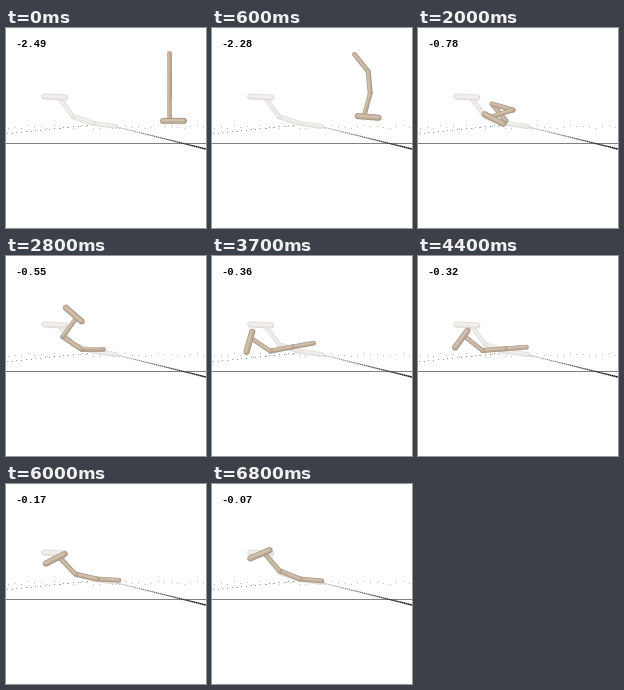
A matplotlib script that plays this animation: 200 by 200 pixels, repeating every 8 s.

```python
import matplotlib.pyplot as plt
import numpy as np
from matplotlib.animation import FuncAnimation

SIZE, DPI = 200, 100
STEP, FRAMES = 100, 80
END = 6800                       # the last pose is held from here on
FALL = 1200                      # the first stage starts from rest
PT = 72 / DPI

TORSO, THIGH, LEG, FOOT = 22, 22, 24, 21
HEEL = 0.3                       # share of the foot behind the ankle

# time: hip x, hip y, directions of torso, thigh, leg, foot in degrees, score
KEYS = {
    0: (163, 47, 270, 90, 90, 0, -2.49),
    FALL: (136, 33, 115, 69, 151, 18, -1.65),
    2000: (74, 76, 50, 16, 163, 27, -0.78),
    2800: (75, 93, 0, -146, -54, -139, -0.55),
    3200: (74, 92, -3, -172, -172, -180, -0.46),
    3700: (80, 91, -10, -191, -146, -254, -0.36),
    5200: (94, 95, 2, -177, -137, -211, -0.27),
    END: (88, 95, 5, -158, -131, -203, -0.07),
}
GOAL = (88, 95.5, 8, 198, 234, 183)
TAN = ("#a99886", "#c0ad99", "#d0c0ae")
PALE = ("#e0ddd9", "#e9e6e3", "#f2f0ee")


def state_at(t):
    if t < FALL:
        t = t * t / FALL
    return [np.interp(t, list(KEYS), column) for column in zip(*KEYS.values())]


def limbs(x, y, *turns):
    """End points of torso, thigh, leg and foot."""
    torso, thigh, leg, foot = (np.array([np.cos(a), np.sin(a)]) for a in np.radians(turns))
    hip = np.array([x, y])
    knee = hip + THIGH * thigh
    ankle = knee + LEG * leg
    heel = ankle - HEEL * FOOT * foot
    return [(hip + TORSO * torso, hip), (hip, knee), (knee, ankle), (heel, heel + FOOT * foot)]


fig = plt.figure(figsize=(SIZE / DPI, SIZE / DPI), dpi=DPI, facecolor="white")
ax = fig.add_axes([0, 0, 1, 1])
ax.set(xlim=(0, SIZE), ylim=(SIZE, 0))
ax.axis("off")


def make_body(colors, z):
    def stroke(color, width, level):
        return ax.plot([], [], color=color, lw=width * PT, solid_capstyle="round",
                       zorder=level)[0]

    return [[stroke(c, w * k, z + i * 0.1) for c, k in zip(colors, (1, 0.75, 0.35))]
            for i, w in enumerate((4.8, 5, 4.6, 6.2))]


def place(body, pose):
    for layers, (a, b) in zip(body, limbs(*pose)):
        for i, line in enumerate(layers):
            line.set_data(*(np.array([a, b]) - 0.3 * i).T)


def draw_floor():
    ax.plot([0, SIZE], [114.5, 114.5], color="#808080", lw=PT, zorder=1)

    def dots(x, y, color):
        ax.scatter(x, y, s=(0.9 * PT) ** 2, c=color, lw=0, zorder=1)

    x = np.arange(1, 82, 4.7)
    dots(x, 105.5 - x * 0.105, "#8c8c8c")
    rng = np.random.default_rng(4)
    x = np.arange(2, SIZE, 6.5)
    dots(x, 98.5 + rng.uniform(-2, 2, x.size), "#b0b0b0")

    # Checkered edge that grows toward the viewer
    for x in np.arange(110, SIZE, 1.9):
        near = (x - 100) / 100
        y = 98.8 + (x - 110) * 0.247
        ax.plot([x, x + 1 + 0.8 * near], [y, y + 0.25 + 0.2 * near],
                color=str(0.72 - 0.67 * near), lw=(0.8 + 0.7 * near) * PT,
                solid_capstyle="butt", zorder=1)


draw_floor()
place(make_body(PALE, 2), GOAL)
body = make_body(TAN, 3)
label = ax.text(9, 19, "", family="Liberation Mono", weight="bold",
                size=10.4 * PT, color="black", va="baseline")


def update(i):
    *pose, score = state_at(min(i * STEP, END))
    place(body, pose)
    label.set_text(f"{score:.2f}")
    return [label] + sum(body, [])


anim = FuncAnimation(fig, update, frames=FRAMES, interval=STEP, repeat=True, repeat_delay=0)
plt.show()
```
